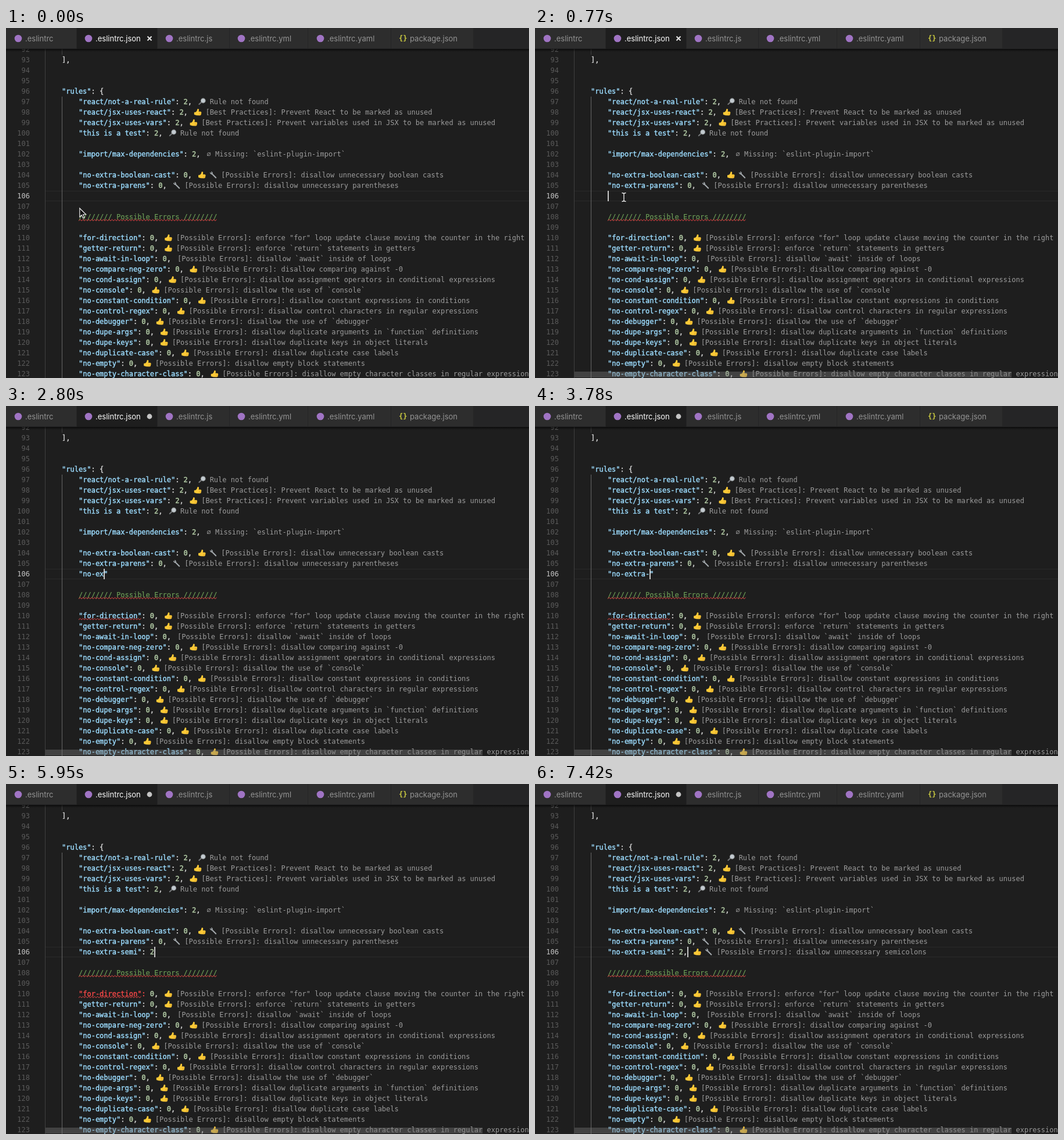
These frames come from a looping animation (900x602 px, 7490 ms). An HTML page with a canvas:

```html
<!DOCTYPE html>
<html lang="en">
<head>
<meta charset="utf-8">
<title>Lint rule editor</title>
<style>
html, body { margin: 0; width: 100%; height: 100%; overflow: hidden; background: #1e1e1e; }
canvas { display: block; }
</style>
</head>
<body>
<canvas id="stage" width="900" height="602"></canvas>
<script>
(() => {
const ctx = document.getElementById('stage').getContext('2d');
const LOOP = 7490, STEP = 70;
const MONO = '12px "DejaVu Sans Mono", Menlo, monospace';
const UI = '13px Inter, Roboto, sans-serif';
const CW = 7.224, ROW = 18, LEFT = 125;
const KEY = '#9cdcfe', NUM = '#b5cea8', PUNCT = '#d4d4d4', NOTE = '#9c9c9c', RED = '#f44747';

// line number, key, value, icons (u = thumb, w = wrench, m = magnifier), note
const pe = s => '[Possible Errors]: ' + s;
const bp = s => '[Best Practices]: ' + s;
const RULES = [
  [97, 'react/not-a-real-rule', 2, 'm', 'Rule not found'],
  [98, 'react/jsx-uses-react', 2, 'u', bp('Prevent React to be marked as unused')],
  [99, 'react/jsx-uses-vars', 2, 'u', bp('Prevent variables used in JSX to be marked as unused')],
  [100, 'this is a test', 2, 'm', 'Rule not found'],
  [102, 'import/max-dependencies', 2, '', '∅ Missing: `eslint-plugin-import`'],
  [104, 'no-extra-boolean-cast', 0, 'uw', pe('disallow unnecessary boolean casts')],
  [105, 'no-extra-parens', 0, 'w', pe('disallow unnecessary parentheses')],
  [110, 'for-direction', 0, 'u', pe('enforce "for" loop update clause moving the counter in the right direction')],
  [111, 'getter-return', 0, 'u', pe('enforce `return` statements in getters')],
  [112, 'no-await-in-loop', 0, '', pe('disallow `await` inside of loops')],
  [113, 'no-compare-neg-zero', 0, 'u', pe('disallow comparing against -0')],
  [114, 'no-cond-assign', 0, 'u', pe('disallow assignment operators in conditional expressions')],
  [115, 'no-console', 0, 'u', pe('disallow the use of `console`')],
  [116, 'no-constant-condition', 0, 'u', pe('disallow constant expressions in conditions')],
  [117, 'no-control-regex', 0, 'u', pe('disallow control characters in regular expressions')],
  [118, 'no-debugger', 0, 'u', pe('disallow the use of `debugger`')],
  [119, 'no-dupe-args', 0, 'u', pe('disallow duplicate arguments in `function` definitions')],
  [120, 'no-dupe-keys', 0, 'u', pe('disallow duplicate keys in object literals')],
  [121, 'no-duplicate-case', 0, 'u', pe('disallow duplicate case labels')],
  [122, 'no-empty', 0, 'u', pe('disallow empty block statements')],
  [123, 'no-empty-character-class', 0, 'u', pe('disallow empty character classes in regular expressions')]
];

// left edge, right edge, icon centre, label start, label
const TABS = [
  [0, 121, 21, 33, '.eslintrc'],
  [122, 260, 142, 154, '.eslintrc.json'],
  [261, 384, 281, 293, '.eslintrc.js'],
  [385, 519, 405, 417, '.eslintrc.yml'],
  [520, 662, 541, 553, '.eslintrc.yaml'],
  [663, 804, 683, 695, 'package.json']
];

const TYPED = '"no-extra-semi": 2,';
const KEYS_AT = [1470, 1680, 1890, 2240, 2450, 2660, 3010, 3290, 3500, 3780,
  4060, 4200, 4340, 4480, 4690, 5180, 5390, 5740, 6300];
const CLICK = 560, SQUIGGLE = 2450, VALUE = 5740, COMMA = 6300, HINT = 6440;

const rowTop = n => 280 + (n - 106) * ROW;

function rect(x, y, w, h, color) {
  ctx.fillStyle = color;
  ctx.fillRect(x, y, w, h);
}

function disc(x, y, r, color) {
  ctx.fillStyle = color;
  ctx.beginPath();
  ctx.arc(x, y, r, 0, 7);
  ctx.fill();
}

function line(points, color, width) {
  ctx.strokeStyle = color;
  ctx.lineWidth = width;
  ctx.beginPath();
  points.forEach(([x, y]) => ctx.lineTo(x, y));
  ctx.stroke();
}

// Draws one run of code and returns where it ends.
function code(text, x, n, color, weight = 0.4) {
  const y = rowTop(n) + 13;
  ctx.font = MONO;
  ctx.fillStyle = color;
  ctx.fillText(text, x, y);
  if (weight) {
    ctx.strokeStyle = color;
    ctx.lineWidth = weight;
    ctx.strokeText(text, x, y);
  }
  return x + text.length * CW;
}

function squiggle(x, end, y) {
  const pts = [];
  for (let i = 0; x + i * 2.5 <= end; i++) pts.push([x + i * 2.5, y + (i % 2 ? -1.2 : 1.2)]);
  line(pts, RED, 1);
}

const ICONS = {
  u(x, y) {
    ctx.fillStyle = '#fbc937';
    ctx.beginPath();
    ctx.moveTo(x, y);
    ctx.lineTo(x + 3, y - 0.5);
    ctx.quadraticCurveTo(x + 5.5, y - 2.5, x + 5.5, y - 5.5);
    ctx.quadraticCurveTo(x + 8, y - 7, x + 8.2, y - 4);
    ctx.lineTo(x + 7.8, y - 1.2);
    ctx.lineTo(x + 11, y - 1.2);
    ctx.quadraticCurveTo(x + 13.2, y - 0.4, x + 12.2, y + 2);
    ctx.quadraticCurveTo(x + 12, y + 5.5, x + 9.5, y + 5.5);
    ctx.lineTo(x + 4, y + 5.2);
    ctx.lineTo(x, y + 4);
    ctx.fill();
    for (const d of [0.8, 2.6, 4.2]) line([[x + 8, y + d], [x + 11.8, y + d]], '#d99a22', 0.5);
  },
  w(x, y) {
    ctx.lineCap = 'round';
    line([[x + 3.5, y - 2.5], [x + 10.5, y + 4.5]], '#a3a9ad', 2);
    line([[x + 1, y - 3.8], [x + 2.6, y - 2], [x + 4.4, y - 3.4], [x + 3.2, y - 5.4]], '#a3a9ad', 1.6);
    ctx.lineCap = 'butt';
  },
  m(x, y) {
    ctx.lineCap = 'round';
    line([[x + 1.2, y + 4.2], [x + 5, y + 0.8]], '#77797b', 2);
    ctx.lineCap = 'butt';
    disc(x + 8.2, y - 2, 4.4, '#8f9496');
    disc(x + 8.2, y - 2, 3.3, '#c3cbd0');
  }
};

function hint(x, n, icons, note) {
  x += 11;
  for (const i of icons) {
    ICONS[i](x, rowTop(n) + 9);
    x += 19.6;
  }
  code(note, x, n, NOTE, 0);
}

function drawRule([n, key, value, icons, note], bad) {
  let x = code('"' + key + '"', LEFT, n, bad ? RED : KEY);
  x = code(':', x, n, bad ? RED : PUNCT);
  x = code(String(value), x + CW, n, NUM);
  x = code(',', x, n, PUNCT);
  hint(x, n, icons, note);
}

function drawTyped(t) {
  const count = KEYS_AT.filter(k => k <= t).length;
  const open = count > 0 && count < 15;
  code(TYPED.slice(0, Math.min(count, 15)) + (open ? '"' : ''), LEFT, 106, KEY);
  if (count > 15) code(':', LEFT + 15 * CW, 106, PUNCT);
  if (count > 17) code('2', LEFT + 17 * CW, 106, NUM);
  if (count > 18) code(',', LEFT + 18 * CW, 106, PUNCT);
  if (t >= HINT) hint(LEFT + 19 * CW, 106, 'uw', pe('disallow unnecessary semicolons'));

  const last = count ? KEYS_AT[count - 1] : CLICK;
  if (t >= CLICK && (t - last) % 1000 < 500) {
    rect(Math.round(LEFT + count * CW), 280, 2, ROW, '#c8c8c8');
  }
}

function drawGutter() {
  ctx.textAlign = 'right';
  for (let n = 92; n <= 123; n++) code(String(n), 41, n, n === 106 ? '#c6c6c6' : '#5a5a5a', 0);
  ctx.textAlign = 'left';
}

function drawTabs(dirty) {
  rect(0, 0, 900, 36, '#252526');
  ctx.font = UI;
  TABS.forEach(([a, b, icon, x, label], i) => {
    const active = i === 1;
    rect(a, 0, b - a, active ? 36 : 35, active ? '#1e1e1e' : '#2d2d2d');
    if (i < 5) disc(icon, 18, 6.3, '#a074c4');
    ctx.fillStyle = active ? '#ffffff' : '#949494';
    ctx.fillText(label, x, 23);
  });
  ctx.font = 'bold 12px "DejaVu Sans Mono", monospace';
  ctx.fillStyle = '#cbcb41';
  ctx.fillText('{}', 676, 22);
  if (dirty) disc(247, 18, 4.4, '#c5c5c5');
  else {
    line([[243.5, 14.5], [250.5, 21.5]], '#e8e8e8', 2);
    line([[250.5, 14.5], [243.5, 21.5]], '#e8e8e8', 2);
  }
  const shade = ctx.createLinearGradient(0, 36, 0, 41);
  shade.addColorStop(0, 'rgba(0,0,0,.6)');
  shade.addColorStop(1, 'rgba(0,0,0,0)');
  rect(0, 36, 900, 5, shade);
}

function drawArrow(x, y) {
  ctx.beginPath();
  [[0, 0], [0, 15], [3.4, 11.8], [5.8, 17], [8.2, 16], [5.9, 10.9], [10.6, 10.6]]
    .forEach(([dx, dy]) => ctx.lineTo(x + dx, y + dy));
  ctx.closePath();
  ctx.fillStyle = '#111';
  ctx.fill();
  ctx.strokeStyle = '#eee';
  ctx.lineWidth = 1.2;
  ctx.stroke();
}

function drawBeam(x, y) {
  for (const [color, w] of [['#111', 3], ['#f2f2f2', 1.4]]) {
    line([[x, y - 6.5], [x, y + 6.5]], color, w);
    for (const s of [-1, 1]) line([[x - 3.5, y + s * 7.5], [x, y + s * 6.5], [x + 3.5, y + s * 7.5]], color, w);
  }
}

function drawMouse(t) {
  if (t >= KEYS_AT[0]) return;
  const p = Math.min(1, t / 490), e = p * p * (3 - 2 * p);
  if (t < 140) drawArrow(126.8 + 26 * e, 310 - 19 * e);
  else drawBeam(127 + 26 * e, 311 - 20 * e);
}

function draw(t) {
  rect(0, 0, 900, 602, '#1e1e1e');
  rect(68, 280, 832, 1, '#2a2a2a');
  rect(68, 297, 832, 1, '#2a2a2a');
  rect(67, 36, 1, 566, '#404040');
  rect(96, 36, 1, 10, '#404040');
  rect(96, 118, 1, 484, '#666666');

  drawGutter();
  code('],', 96, 93, PUNCT);
  code(' {', code(':', code('"rules"', 96, 96, KEY), 96, PUNCT), 96, PUNCT);
  const bad = t >= VALUE && t < COMMA;
  for (const r of RULES) drawRule(r, bad && r[0] === 110);

  const end = code('//////// Possible Errors ////////', LEFT, 108, '#6a9955', 0.2);
  squiggle(LEFT, end, 330.5);
  if (t >= SQUIGGLE && t < COMMA) squiggle(LEFT, LEFT + 15 * CW, 366.5);

  drawTyped(t);
  const show = Math.max(0, Math.min(1, (t - 140) / 140));
  rect(68, 591, 752, 10, `rgba(121,121,121,${0.4 * show})`);
  drawTabs(t >= KEYS_AT[0]);
  drawMouse(t);
}

function frame() {
  const t = performance.now() % LOOP;
  draw(Math.floor(t / STEP) * STEP);
  requestAnimationFrame(frame);
}
frame();
})();
</script>
</body>
</html>
```
